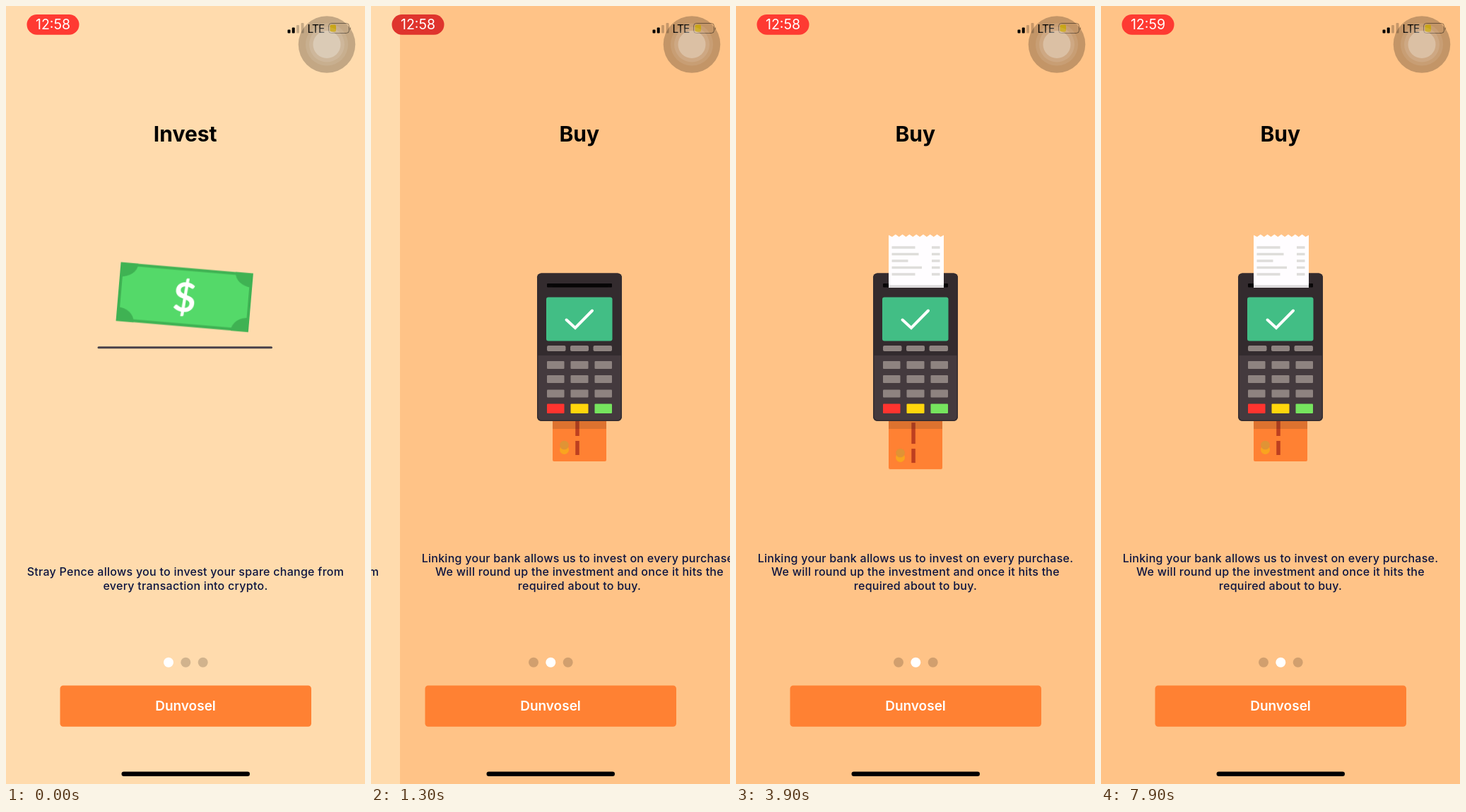
These frames come from a looping animation (508 px wide and 1102 px high, 8000 ms). An HTML page:

```html
<!DOCTYPE html>
<html lang="en">
<head>
<meta charset="utf-8">
<title>Onboarding</title>
<style>
  html, body { margin: 0; width: 100%; height: 100%; overflow: hidden; background: #ffdbad; }
  svg { display: block; width: 100vw; height: 100vh; font-family: Inter, sans-serif; }
  text { text-anchor: middle; }
  .title { font-size: 30px; font-weight: 700; }
  .body { font-size: 16px; font-weight: 500; letter-spacing: .27px; fill: #0c1440; }
  .button { font-size: 19px; font-weight: 600; fill: #fff; }
  .clock { font-size: 19.5px; fill: #fff; }
  .network { font-size: 15.5px; letter-spacing: -.9px; }
  .dollar { font: 700 57px Lato, sans-serif; fill: #fff; }

  .pages, .bill, .coin, .receipt, .card, .first, .second, .before, .after { animation: 8s linear infinite; }
  .pages { animation-name: swipe; animation-timing-function: step-end; }
  .bill { animation-name: drop; }
  .coin { animation-name: emerge; }
  .receipt { animation-name: print; }
  .card { animation-name: pull; }
  .first { animation-name: deselect; }
  .second { animation-name: select; }
  .before { animation-name: hide; }
  .after { animation-name: show; }
  .pill { animation: pulse 2s ease-in-out infinite; }

  @keyframes swipe {
    0% { transform: translateX(0); }
    12.45% { transform: translateX(-70px); }
    13.7% { transform: translateX(-247.5px); }
    14.95% { transform: translateX(-400px); }
    16.2% { transform: translateX(-467px); }
    17.45% { transform: translateX(-494px); }
    18.7% { transform: translateX(-504px); }
    19.95%, 100% { transform: translateX(-508px); }
  }
  @keyframes drop {
    0% { transform: rotate(4.9deg); }
    1.25% { transform: translateY(4px) rotate(3deg); }
    2.5% { transform: translateY(34px) rotate(0deg); }
    5%, 100% { transform: translateY(135px); }
  }
  @keyframes emerge {
    0%, 3.75% { transform: translateY(-180px); }
    6.25% { transform: translateY(-76px); }
    8.75% { transform: translateY(-6px); }
    10%, 100% { transform: translateY(0); }
  }
  @keyframes print {
    0%, 16.9% { transform: translateY(76px); }
    23.75% { transform: translateY(34px); }
    29.4%, 55% { transform: translateY(0); }
    61.25%, 79.4% { transform: translateY(76px); }
    80% { transform: translateY(72.5px); }
    91.9%, 100% { transform: translateY(0); }
  }
  @keyframes pull {
    0%, 46.25% { transform: translateY(0); }
    48.75% { transform: translateY(11px); }
    53.75%, 58.75% { transform: translateY(56px); }
    66.25%, 100% { transform: translateY(0); }
  }
  @keyframes deselect {
    0%, 16.19% { fill: #fff; fill-opacity: 1; }
    16.2%, 100% { fill: #000; fill-opacity: .18; }
  }
  @keyframes select {
    0%, 16.19% { fill: #000; fill-opacity: .18; }
    16.2%, 100% { fill: #fff; fill-opacity: 1; }
  }
  @keyframes hide { 0%, 89.99% { opacity: 1; } 90%, 100% { opacity: 0; } }
  @keyframes show { 0%, 89.99% { opacity: 0; } 90%, 100% { opacity: 1; } }
  @keyframes pulse {
    0%, 100% { fill: #ff3a32; }
    20% { fill: #fc3931; }
    50% { fill: #d7322c; }
  }
</style>
</head>
<body>
<svg viewBox="0 0 508 1102" preserveAspectRatio="none">
  <defs>
    <clipPath id="aboveLine"><rect width="508" height="483"/></clipPath>
    <clipPath id="belowLine"><rect y="484" width="508" height="300"/></clipPath>
    <clipPath id="aboveSlot"><rect width="508" height="398.5"/></clipPath>
    <clipPath id="belowTerminal"><rect y="580" width="508" height="300"/></clipPath>
    <clipPath id="note"><rect x="-94" y="-41.5" width="188" height="83"/></clipPath>
    <g id="keys">
      <rect x="208" width="24.5" height="11" rx="1"/>
      <rect x="241.5" width="25" height="11" rx="1"/>
      <rect x="275.5" width="24.5" height="11" rx="1"/>
    </g>
  </defs>

  <g class="pages">
    <!-- Invest -->
    <rect width="508" height="1102" fill="#ffdbad"/>
    <text class="title" x="253.7" y="191.5">Invest</text>
    <g clip-path="url(#aboveLine)">
      <g transform="translate(252.7 412.3)">
        <g class="bill">
          <rect x="-94" y="-41.5" width="188" height="83" fill="#3fb253"/>
          <rect x="-90" y="-37.5" width="180" height="75" fill="#54d969"/>
          <g fill="#3fb253" clip-path="url(#note)">
            <ellipse cx="-94" cy="-41.5" rx="25" ry="20"/>
            <ellipse cx="94" cy="-41.5" rx="25" ry="20"/>
            <ellipse cx="-94" cy="41.5" rx="25" ry="20"/>
            <ellipse cx="94" cy="41.5" rx="25" ry="20"/>
          </g>
          <text class="dollar" y="20.5">$</text>
        </g>
      </g>
    </g>
    <g clip-path="url(#belowLine)">
      <g class="coin" fill="none">
        <circle cx="254" cy="590" r="63" stroke="#f8c114" stroke-width="14.5"/>
        <circle cx="254" cy="590" r="63" stroke="#fff" stroke-width="2.4"
          pathLength="15" stroke-dasharray=".5 .5" stroke-dashoffset=".5"/>
        <circle cx="254" cy="590" r="32" fill="#f8c114"/>
      </g>
    </g>
    <path d="M131 483.8H375.5" stroke="#48414a" stroke-width="3" stroke-linecap="round"/>
    <text class="body" x="254" y="807">Stray Pence allows you to invest your spare change from</text>
    <text class="body" x="254" y="826.5">every transaction into crypto.</text>

    <!-- Buy -->
    <g transform="translate(508 0)">
      <rect width="508" height="1102" fill="#ffc387"/>
      <text class="title" x="253.7" y="191.5">Buy</text>

      <g clip-path="url(#belowTerminal)">
        <g class="card">
          <rect x="216" y="523" width="76" height="122" rx="2" fill="#ff8133"/>
          <path d="M251 532v13m0 7v20m0 7v30m0 7v20" stroke="#bd3f20" stroke-width="5.5"/>
          <circle cx="232.5" cy="628.5" r="6.5" fill="#f9a41f"/>
          <circle cx="232.5" cy="622" r="6.3" fill="#e09335"/>
        </g>
      </g>
      <rect x="216" y="586" width="76" height="13" fill="#3a2a20" fill-opacity=".17"/>

      <rect x="194" y="378.5" width="120" height="209.5" rx="6" fill="#443a3e"/>
      <path d="M194 495V384.5a6 6 0 0 1 6-6H308a6 6 0 0 1 6 6V495z" fill="#332b2e"/>
      <path d="M194.7 495V581a6 6 0 0 0 6 6.3H307.3a6 6 0 0 0 6-6.3V495" fill="none" stroke="#332b2e" stroke-width="1.4"/>
      <rect x="208" y="393" width="92" height="5.5" rx="1" fill="#080607"/>

      <g clip-path="url(#aboveSlot)">
        <g class="receipt">
          <path fill="#fffdff" d="M216 403V324.5l4.9 2.5 4.9-3.5 4.9 3.5 4.9-3.5 4.9 3.5 4.9-3.5 4.9 3.5 4.9-3.5 4.9 3.5 4.9-3.5 4.9 3.5 4.9-3.5 4.9 3.5 4.9-3.5 4.9 3.5 4.5-2.5V403z"/>
          <path d="M220.5 342h33m-33 9.5h38m-38 9.5h23m-23 9.5h42.5m-42.5 9.5h33M277 342h11.5m-11.5 9.5h11.5m-11.5 9.5h11.5m-11.5 9.5h11.5m-11.5 9.5h11.5" stroke="#deddda" stroke-width="3.5"/>
        </g>
      </g>
      <rect x="216" y="395.5" width="78" height="3" fill-opacity=".15"/>

      <rect x="207" y="412.5" width="93.5" height="62" rx="3" fill="#42be85"/>
      <path d="M235.5 444.5L248 456L272 431.5" fill="none" stroke="#fff" stroke-width="4" stroke-linecap="round"/>
      <g fill="#8e8380">
        <rect x="208" y="481" width="26.5" height="8" rx="2"/>
        <rect x="241" y="481" width="26" height="8" rx="2"/>
        <rect x="273.5" y="481" width="26.5" height="8" rx="2"/>
        <use href="#keys" y="503"/>
        <use href="#keys" y="523"/>
        <use href="#keys" y="543.5"/>
      </g>
      <rect x="208" y="563.5" width="24.5" height="13.5" rx="1" fill="#ff342f"/>
      <rect x="241.5" y="563.5" width="25" height="13.5" rx="1" fill="#ffd60c"/>
      <rect x="275.5" y="563.5" width="24.5" height="13.5" rx="1" fill="#76e45e"/>

      <text class="body" x="254" y="787.5">Linking your bank allows us to invest on every purchase.</text>
      <text class="body" x="254" y="807">We will round up the investment and once it hits the</text>
      <text class="body" x="254" y="826.5">required about to buy.</text>
    </g>
  </g>

  <!-- Controls -->
  <circle class="first" cx="230" cy="929.7" r="7"/>
  <circle class="second" cx="254.3" cy="929.7" r="7"/>
  <circle cx="278.7" cy="929.7" r="7" fill-opacity=".18"/>
  <rect x="76.5" y="962.5" width="355.5" height="58.3" rx="4.5" fill="#ff8133"/>
  <text class="button" x="254" y="998">Dunvosel</text>
  <rect x="163.5" y="1084.5" width="181.5" height="6.5" rx="3.25"/>

  <!-- Status bar -->
  <rect class="pill" x="29.5" y="12" width="74" height="28.7" rx="14.3"/>
  <text class="clock before" x="66.5" y="33.3">12:58</text>
  <text class="clock after" x="66.5" y="33.3">12:59</text>
  <rect x="398.5" y="33.5" width="4" height="5" rx="1"/>
  <rect x="404.7" y="30.5" width="4" height="8" rx="1"/>
  <g fill-opacity=".22">
    <rect x="411" y="27" width="4" height="11.5" rx="1"/>
    <rect x="417.5" y="24" width="4" height="14.5" rx="1"/>
  </g>
  <text class="network" x="438.5" y="37.7">LTE</text>
  <rect x="456.5" y="24.5" width="29" height="14" rx="4" fill="none" stroke="#000" stroke-opacity=".45"/>
  <path d="M487 29v5q1.8-2.5 0-5" fill-opacity=".5"/>
  <rect x="458.5" y="26.5" width="8.5" height="10" rx="2" fill="#ffcc00"/>

  <!-- Floating touch button -->
  <circle cx="454" cy="54.5" r="40.3" fill-opacity=".235"/>
  <g fill="#fff">
    <circle cx="454" cy="54.5" r="30" fill-opacity=".09"/>
    <circle cx="454" cy="54.5" r="25" fill-opacity=".1"/>
    <circle cx="454" cy="54.5" r="19.5" fill-opacity=".27"/>
  </g>
</svg>
</body>
</html>
```
